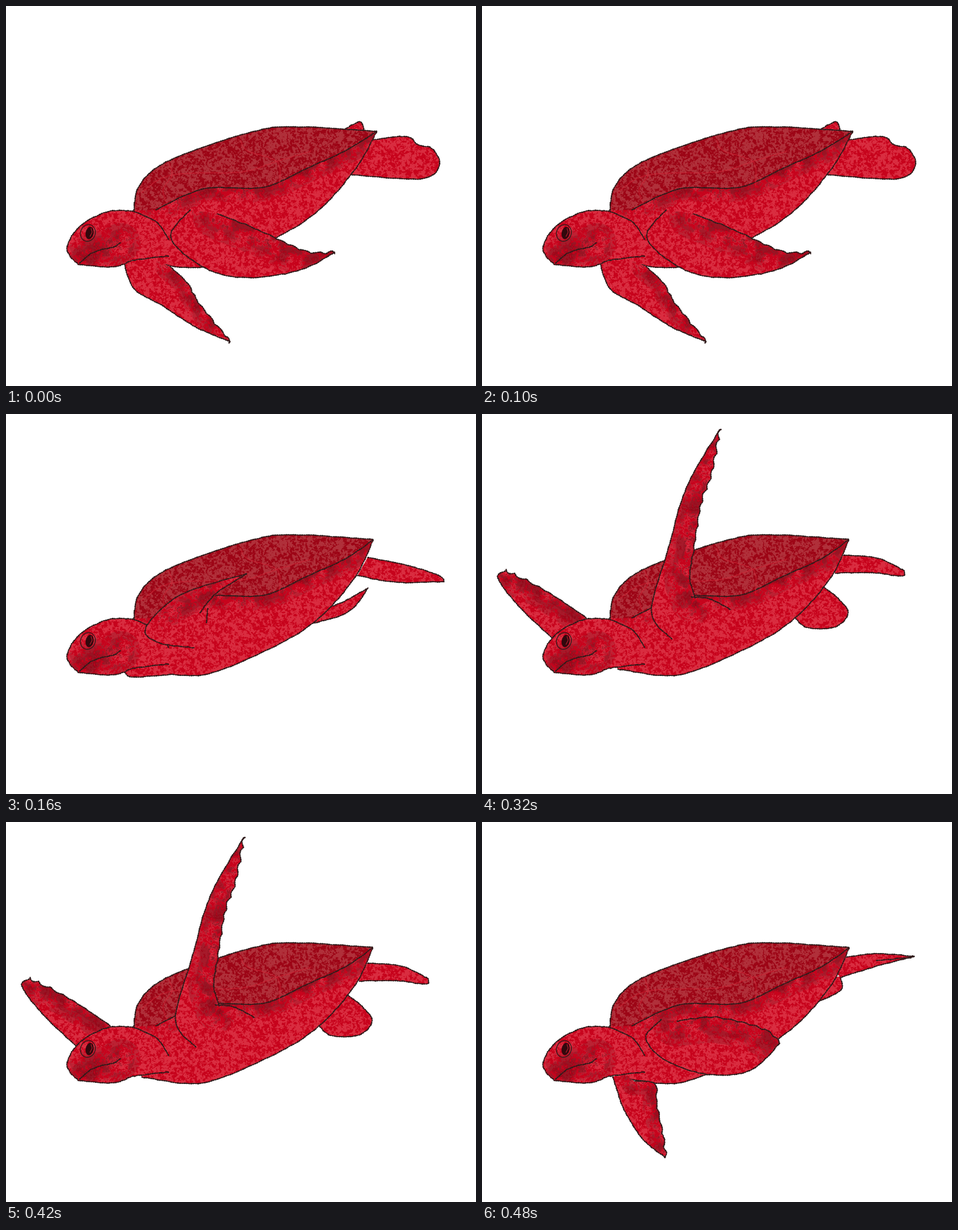
An HTML page with a canvas for the animation above (0.64 s loop, 832x673 px).

```html
<!DOCTYPE html>
<html lang="en">
<head>
<meta charset="utf-8">
<title>Swimming turtle</title>
<style>
html, body { margin: 0; width: 100%; height: 100%; overflow: hidden; background: #fff; }
canvas { display: block; width: 832px; height: 673px; }
</style>
</head>
<body>
<canvas id="stage" width="832" height="673"></canvas>
<script>
const W = 832, H = 673, HOLD = 160, INK = '#301c1c';

function newCanvas() {
  const c = document.createElement('canvas');
  c.width = W;
  c.height = H;
  return c;
}

// Seeded smooth noise on a grid of the given cell size.
function makeNoise(cell, seed) {
  const cols = Math.ceil(W / cell) + 2, rows = Math.ceil(H / cell) + 2;
  const grid = Float32Array.from({ length: cols * rows }, () => {
    seed = (seed * 1664525 + 1013904223) >>> 0;
    return seed / 2 ** 32;
  });
  const ease = t => t * t * (3 - 2 * t);
  const mix = (a, b, t) => a + (b - a) * t;
  return (x, y) => {
    const gx = Math.floor(x / cell), gy = Math.floor(y / cell), i = gy * cols + gx;
    const u = ease(x / cell - gx), v = ease(y / cell - gy);
    return mix(mix(grid[i], grid[i + 1], u),
      mix(grid[i + cols], grid[i + cols + 1], u), v);
  };
}

const clamp = t => Math.max(0, Math.min(1, t));
const wide = makeNoise(14, 51), coarse = makeNoise(6, 11);
const medium = makeNoise(3, 23), fine = makeNoise(1.5, 37);
const grain = (x, y) => coarse(x, y) * .25 + medium(x, y) * .4 + fine(x, y) * .35;

function makePattern(colorAt) {
  const c = newCanvas(), g = c.getContext('2d'), img = g.createImageData(W, H);
  for (let y = 0, i = 0; y < H; y++)
    for (let x = 0; x < W; x++, i += 4) img.data.set(colorAt(x, y), i);
  g.putImageData(img, 0, 0);
  return g.createPattern(c, 'no-repeat');
}

function speckle(dark, light) {
  return makePattern((x, y) => {
    const t = clamp((grain(x, y) - .43) * 8);
    return [...dark.map((d, k) => d + (light[k] - d) * t), 255];
  });
}

const RED = speckle([199, 3, 28], [217, 45, 64]);
const SHELL = speckle([157, 5, 22], [176, 48, 58]);
const MOTTLE = makePattern((x, y) => {
  const n = wide(x, y) * .35 + grain(x, y) * .65;
  return [120, 8, 22, 200 * clamp((n - .44) * 8)];
});

let ctx;

const parse = text => text.trim().split(/\s+/).map(s => s.split(',').map(Number));

// Hand-drawn edge through key points; scallops fade out along its length.
function edge(keys, scallop = 0) {
  const out = [], steps = 14, last = keys.length - 1;
  let run = 0;
  for (let i = 0; i < last; i++) {
    const b = keys[i], c = keys[i + 1], a = keys[i - 1] || b, d = keys[i + 2] || c;
    const len = Math.hypot(c[0] - b[0], c[1] - b[1]);
    const nx = (b[1] - c[1]) / len, ny = (c[0] - b[0]) / len;
    for (let k = i ? 1 : 0; k <= steps; k++) {
      const t = k / steps;
      const [x, y] = [0, 1].map(j => b[j] + .5 * t * (c[j] - a[j]
        + t * (2 * a[j] - 5 * b[j] + 4 * c[j] - d[j]
        + t * (3 * b[j] - a[j] - 3 * c[j] + d[j]))));
      const wave = Math.abs(Math.sin((run + len * t) / 7)) - .5;
      const off = scallop * wave * (1 - (i + t) / last) + (medium(x, y) - .5) * 1.6;
      out.push([x + nx * off, y + ny * off]);
    }
    run += len;
  }
  return out;
}

function trace(points) {
  const path = new Path2D();
  points.forEach(p => path.lineTo(...p));
  return path;
}

function stroke(path, style, width, dash = []) {
  ctx.strokeStyle = style;
  ctx.lineWidth = width;
  ctx.setLineDash(dash);
  ctx.stroke(path);
}

function ink(path) {
  stroke(path, INK, 1.5);
  ctx.lineCap = 'butt';
  stroke(path, INK, 2.4, [3, 2, 1]);
  ctx.lineCap = 'round';
}

const line = text => trace(edge(parse(text)));

function shade(area, path, width) {
  ctx.save();
  ctx.clip(area);
  ctx.globalAlpha = .4;
  for (const k of [1, .7, .4]) stroke(path, MOTTLE, width * k);
  ctx.restore();
}

// "lead / trail | fill": two edges meeting in a sharp tip, then unlined fill corners.
function part(text, { fill = RED, dark = 0, scallop = 0 } = {}) {
  const [outline, corners] = text.split('|');
  const [lead, trail] = outline.split('/').map(parse);
  const front = edge(lead);
  const back = trail ? edge([lead.at(-1), ...trail], scallop) : [];
  const area = trace([...front, ...back, ...(corners ? parse(corners) : [])]);
  ctx.fillStyle = fill;
  ctx.fill(area);
  if (dark) shade(area, trace(back), dark);
  ink(trace([...front, ...back]));
  return area;
}

function drawTrunk(tip) {
  const rim = `${tip},223 605,254 530,289 455,321 350,324 265,361`;
  const body = part(`${tip},223 616,292 540,373 430,433 340,463 240,452 | 226,362`);
  shade(body, line(rim), 50);
  part(`226,362 237,316 290,273 435,223 515,214 ${tip},222 / ${rim.slice(8)}`,
    { fill: SHELL });
  ctx.globalAlpha = .55;
  for (const seam of ['240,330 294,299 415,294 480,275 540,257',
    '288,278 294,299 278,325 285,350', '415,238 428,257 480,276 484,318'])
    stroke(line(seam), '#d4283a', 1.8);
  ctx.globalAlpha = 1;
}

function ellipse(x, y, rx, ry, tilt) {
  const path = new Path2D();
  path.ellipse(x, y, rx, ry, tilt, 0, 7);
  return path;
}

function drawHead() {
  const mouth = line('130,456 155,436 190,427 203,419');
  const head = part(`226,363 178,365 130,391 108,430 128,458 /
    190,462 228,450 288,443 | 288,412 262,378`);
  shade(head, mouth, 70);
  ink(line('226,363 268,384 288,414'));
  ink(mouth);
  stroke(ellipse(145, 402, 13, 15, .35), INK, 1.4);
  ctx.fillStyle = '#32080d';
  ctx.fill(ellipse(148, 402, 7, 11, .2));
  stroke(line('151,394 152,401 149,408'), '#a51c2b', 1.4);
}

const poses = [
  {
    tip: 656,
    hind: ['600,218 627,205 634,222',
      '648,237 708,231 730,246 755,253 767,282 735,306 610,299'],
    far: '209,455 226,500 272,528 335,568 397,595 / 340,525 322,492 290,461 | 250,445',
    near: `326,361 292,410 350,463 425,481 520,468 582,436 /
      530,434 440,394 374,368`
  },
  {
    tip: 650,
    hind: ['640,254 715,269 768,287 775,297 / 690,298 622,286',
      '560,347 600,331 641,308 / 605,351 530,374'],
    far: '209,456 225,466 296,461 | 260,440 215,440',
    near: '426,283 310,320 248,378 270,405 333,414 | 362,380 358,345 372,318',
    creases: ['426,283 372,318 343,352', '357,344 355,370'],
    fold: '275,365 375,305'
  },
  {
    tip: 649,
    hind: ['640,250 700,255 748,278 / 742,287 690,281 625,282 | 615,265',
      '604,306 634,330 648,353 625,377 575,378 552,358'],
    farBehind: '125,398 60,335 28,290 42,277 / 112,312 185,361 | 165,405',
    near: `336,399 300,350 328,245 362,130 421,27 /
      407,105 389,155 375,240 368,290 378,326 | 410,345 380,385`,
    creases: ['370,324 402,327 440,346']
  },
  {
    tip: 650,
    hind: ['634,273 635,298 585,322 | 600,280',
      '645,239 700,233 765,238 / 700,255 636,275 | 615,260'],
    far: '231,451 252,510 285,562 325,594 / 320,555 309,500 306,464 270,459 | 250,445',
    near: '318,350 290,382 325,422 400,447 475,440 527,392 / 500,368 415,346 345,353',
    creases: ['698,245 760,240']
  }
];

function flipper(text, dark) {
  if (text) part(text, { dark, scallop: 5 });
}

const frames = poses.map(pose => {
  const c = newCanvas();
  ctx = c.getContext('2d');
  ctx.lineCap = ctx.lineJoin = 'round';
  pose.hind.forEach(text => part(text));
  drawTrunk(pose.tip);
  flipper(pose.far, 50);
  flipper(pose.farBehind, 70);
  drawHead();
  flipper(pose.near, 90);
  if (pose.fold) shade(line(pose.near.split('|')[0]), line(pose.fold), 40);
  (pose.creases || []).forEach(text => ink(line(text)));
  return c;
});

const screen = document.getElementById('stage').getContext('2d');
let start;

function tick(now) {
  start ??= now;
  const i = Math.floor((now - start) / HOLD) % frames.length;
  screen.fillStyle = '#fff';
  screen.fillRect(0, 0, W, H);
  screen.drawImage(frames[i], 0, 0);
  requestAnimationFrame(tick);
}
requestAnimationFrame(tick);
</script>
</body>
</html>
```
